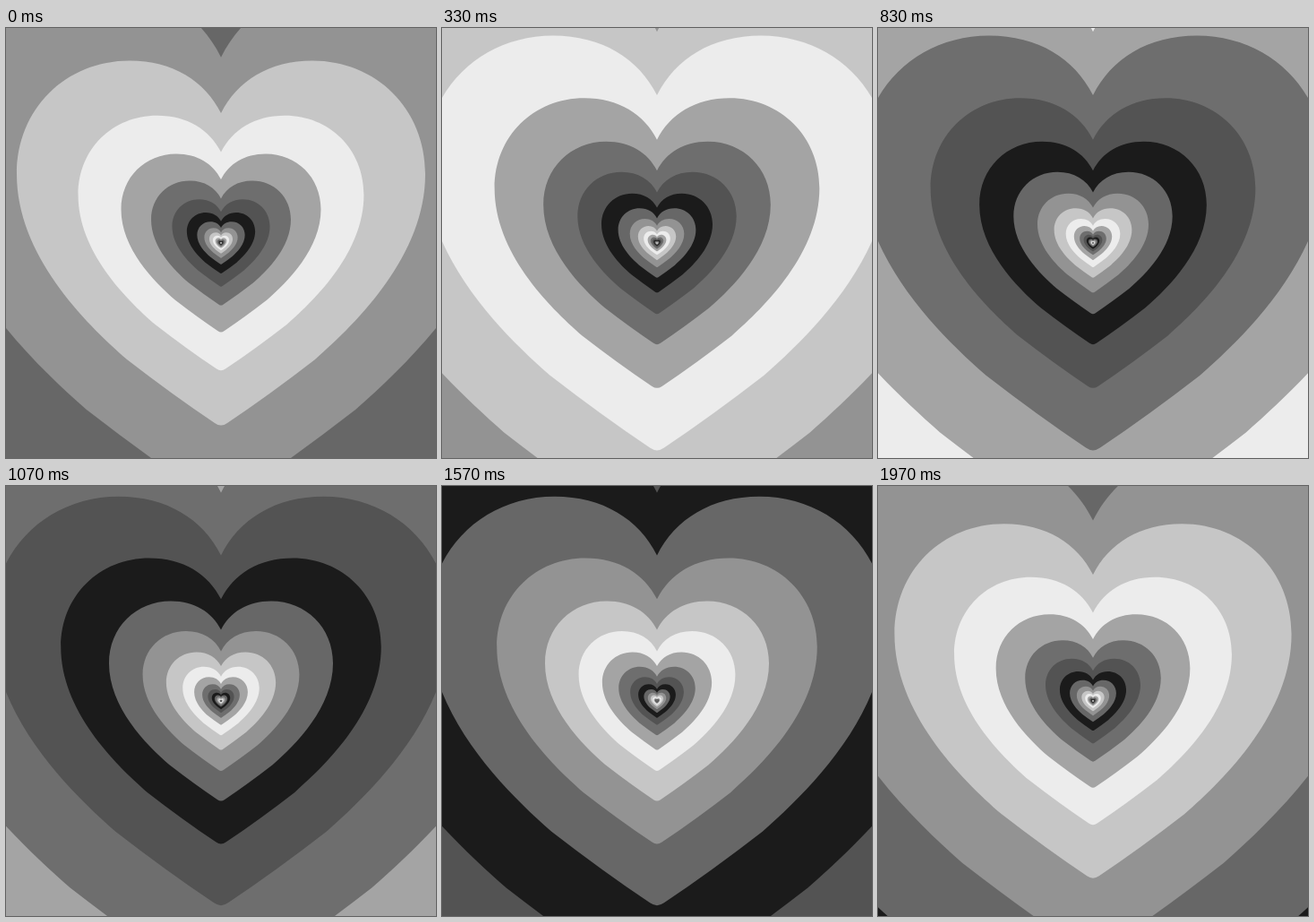
Animation of 480 by 480 pixels, one loop 2.01 s. Source, as an HTML page with a canvas:

```html
<!DOCTYPE html>
<html lang="en">
<head>
<meta charset="utf-8">
<title>Heart tunnel</title>
<style>
  html, body { margin: 0; width: 100%; height: 100%; overflow: hidden; background: #1b1b1b; }
  canvas { display: block; width: 480px; height: 480px; }
</style>
</head>
<body>
<canvas id="stage" width="480" height="480"></canvas>
<script>
const ctx = document.getElementById('stage').getContext('2d');

const LOOP = 2010;      // ms
const STEPS = 60;       // pictures per loop
const TICKS = 100;      // motion ticks per loop
const RATIO = 1.43;     // size of each heart relative to the next one inside
const SHADES = ['#c6c6c6', '#ececec', '#a4a4a4', '#6e6e6e', '#535353', '#1b1b1b', '#676767', '#939393'];
const OUTER = -3, INNER = 27;

// Heart around the vanishing point, 456 units wide
const heart = new Path2D(`M0-145
  C-18-181-54-203.5-102-203.5 C-173-203.5-228-150-228-77
  C-228 13-153 88-105 130 Q-54 169.5-7 201 Q0 206 7 201
  Q54 169.5 105 130 C153 88 228 13 228-77
  C228-150 173-203.5 102-203.5 C54-203.5 18-181 0-145Z`);

// Share of the zoom cycle done: pictures every 1/30 s, motion in 1/50 s ticks
function progress(ms) {
  const centis = Math.floor((ms % LOOP) / 10);
  const step = Math.min(STEPS - 1, Math.floor((centis + 0.5) * 0.3));
  return Math.ceil(step * TICKS / STEPS) / TICKS;
}

function draw(share) {
  const count = SHADES.length;
  const grown = share * count;
  // Start outside so the largest visible heart always covers the stage
  for (let k = OUTER; k <= INNER; k++) {
    const size = RATIO ** (grown - k);
    ctx.setTransform(size, 0, 0, size, 240, 240);
    ctx.fillStyle = SHADES[(k + count) % count];
    ctx.fill(heart);
  }
}

const start = performance.now();
let shown = -1;

function tick() {
  const share = progress(performance.now() - start);
  if (share !== shown) draw(shown = share);
  requestAnimationFrame(tick);
}
tick();
</script>
</body>
</html>
```
